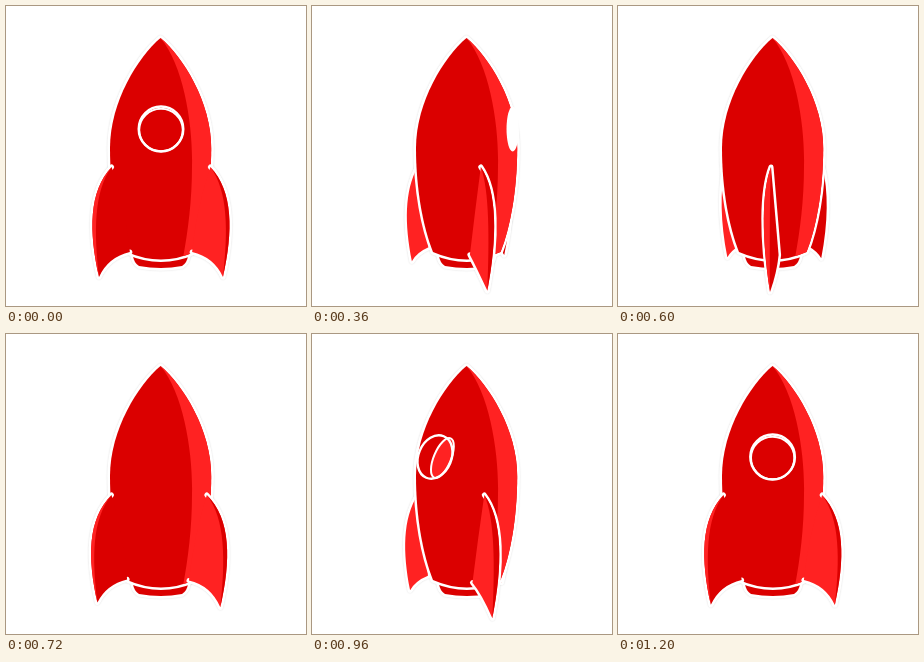
Animation, 300 px wide and 300 px high, one loop 1240 ms. Source, as an HTML page with a canvas:

```html
<!DOCTYPE html>
<html>
<head>
<meta charset="utf-8">
<style>
html, body { margin: 0; width: 100%; height: 100%; overflow: hidden; background: #fff; }
canvas { display: block; width: 300px; height: 300px; }
</style>
</head>
<body>
<canvas id="stage" width="300" height="300"></canvas>
<script>
const ctx = document.getElementById('stage').getContext('2d');
const DARK = '#db0000', LIGHT = '#ff2222', WHITE = '#fff';
const STEP = 40, LOOP = 1240, CX = 155;
const rad = deg => deg * Math.PI / 180;
const wrap = deg => ((deg + 180) % 360 + 360) % 360 - 180;
const clamp = (v, m) => Math.max(-m, Math.min(m, v));

// Turn of the rocket: [step, degrees, degrees per step]
const turn = [
  [0, 0, 0], [4, 15.5, 8], [9, 74, 14.8], [15, 178, 17.5],
  [21, 284, 14.2], [26, 334.5, 8.2], [30, 359.5, 3]
];

function turnAt(step) {
  const i = Math.max(1, turn.findIndex(k => k[0] >= step));
  const [s0, a0, v0] = turn[i - 1], [s1, a1, v1] = turn[i];
  const d = s1 - s0, u = (step - s0) / d, w = 1 - u;
  return a0 * w * w * (1 + 2 * u) + a1 * u * u * (1 + 2 * w)
    + d * u * w * (v0 * w - v1 * u);
}

const bodyPath = new Path2D(
  `M154.5 32C177 51 205.2 96 205.2 142C205.2 185 198 222 188.5 246
   Q155 261 121 246C111.5 222 104 185 104 142C104 96 132 51 154.5 32Z`);
const lightSide = new Path2D(
  `M154.5 32C178 60 187 120 186 160C186 195 182 225 177 252
   L210 256L210 32Z`);
const nozzlePath = new Path2D('M127 250Q128 257 133 260Q155 264 176 260Q181 257 182 250Z');

function outline(path, width = 5) {
  ctx.strokeStyle = WHITE;
  ctx.lineWidth = width;
  ctx.stroke(path);
}

function fill(path, color) {
  ctx.fillStyle = color;
  ctx.fill(path);
}

function halo(path) {
  ctx.save();
  ctx.shadowColor = 'rgba(0,0,0,.16)';
  ctx.shadowBlur = 2;
  outline(path);
  ctx.restore();
}

function makeFin(deg) {
  const a = rad(deg), sin = Math.sin(a), cos = Math.cos(a);
  const side = deg < 0 ? -1 : 1;
  const near = 1 / (1 - 0.276 * cos);
  const thick = 1.5 + 4.5 * Math.abs(cos);
  const facing = Math.max(0, cos) ** 16;
  const top = { x: CX + clamp(57 * sin, 49.5), y: 161 };
  const tip = { x: CX + 61.7 * near * sin, y: 192 + 68 * near };
  const root = {
    x: CX + 40 * sin - side * Math.max(0, 7 * cos),
    y: 243 + 6 * cos
  };
  const ridge = CX + 64 * near * sin;
  const bend = x => (x - 0.12 * top.x - 0.14 * tip.x) / 0.74;
  const low = tip.y / 2 + 90;
  const outer = bend(ridge + side * thick), inner = bend(ridge);

  const edge = new Path2D();
  edge.moveTo(top.x, top.y);
  edge.bezierCurveTo(outer, 185, outer, low, tip.x, tip.y);
  edge.quadraticCurveTo(tip.x + (0.3 + 0.5 * facing) * (root.x - tip.x),
    root.y + 5 + 13 * facing, root.x, root.y);

  const shape = new Path2D(edge);
  const pull = 0.5 + 0.4 * sin * sin;
  shape.quadraticCurveTo(top.x + pull * (root.x - top.x), 205, top.x, top.y);
  shape.closePath();

  const rim = new Path2D();
  rim.moveTo(top.x, top.y);
  rim.bezierCurveTo(outer, 185, outer, low, tip.x, tip.y);
  rim.bezierCurveTo(inner, low, inner, 185, top.x, top.y);

  const front = Math.abs(deg) < 80, rimmed = Math.abs(deg) < 95;
  const mainLight = rimmed === (side > 0);
  return { deg, front, rimmed, edge, shape, rim, mainLight };
}

function drawFin(fin) {
  outline(!fin.front || Math.abs(fin.deg) < 8 ? fin.shape : fin.edge);
  fill(fin.shape, fin.mainLight ? LIGHT : DARK);
  if (fin.rimmed) fill(fin.rim, fin.mainLight ? DARK : LIGHT);
}

function ellipse(x, y, rx, ry, tilt) {
  const path = new Path2D();
  path.ellipse(x, y, rx, ry, tilt, 0, 2 * Math.PI);
  return path;
}

function drawWindow(deg) {
  if (Math.abs(deg) > 95) return;
  const sin = Math.sin(rad(deg)), cos = Math.abs(Math.cos(rad(deg)));
  const hidden = Math.abs(deg) > 66;
  const tilt = hidden ? 0 : -0.8 * sin * cos;
  const x = CX + 47.5 * sin, rx = Math.max(1, 22.3 * cos);
  const frame = ellipse(x, 123, rx, 22.5, tilt);
  if (hidden) {
    fill(frame, WHITE);
    return;
  }
  const inset = Math.min(11 * Math.abs(sin), rx * 0.6);
  const glass = ellipse(x - Math.sign(deg) * inset, 124, Math.max(1, rx - inset - 0.5), 21.3, tilt);
  const lit = deg < -8;
  fill(frame, lit || Math.abs(deg) < 5 ? DARK : LIGHT);
  fill(glass, lit ? LIGHT : DARK);
  outline(glass, 2);
  outline(frame, 2.4);
}

function draw(time) {
  const deg = wrap(turnAt(Math.floor(time % LOOP / STEP)));
  const fins = [-60, 60, 180].map(offset => makeFin(wrap(deg + offset)));
  ctx.fillStyle = WHITE;
  ctx.fillRect(0, 0, 300, 300);
  ctx.lineJoin = ctx.lineCap = 'round';

  [bodyPath, nozzlePath, ...fins.map(f => f.shape)].forEach(halo);
  fins.filter(f => !f.front).forEach(drawFin);
  outline(nozzlePath);
  fill(nozzlePath, DARK);

  outline(bodyPath);
  fill(bodyPath, DARK);
  ctx.save();
  ctx.clip(bodyPath);
  fill(lightSide, LIGHT);
  ctx.restore();

  drawWindow(deg);
  fins.filter(f => f.front).forEach(drawFin);
}

const start = performance.now();
function tick() {
  draw(performance.now() - start);
  requestAnimationFrame(tick);
}
tick();
</script>
</body>
</html>
```
